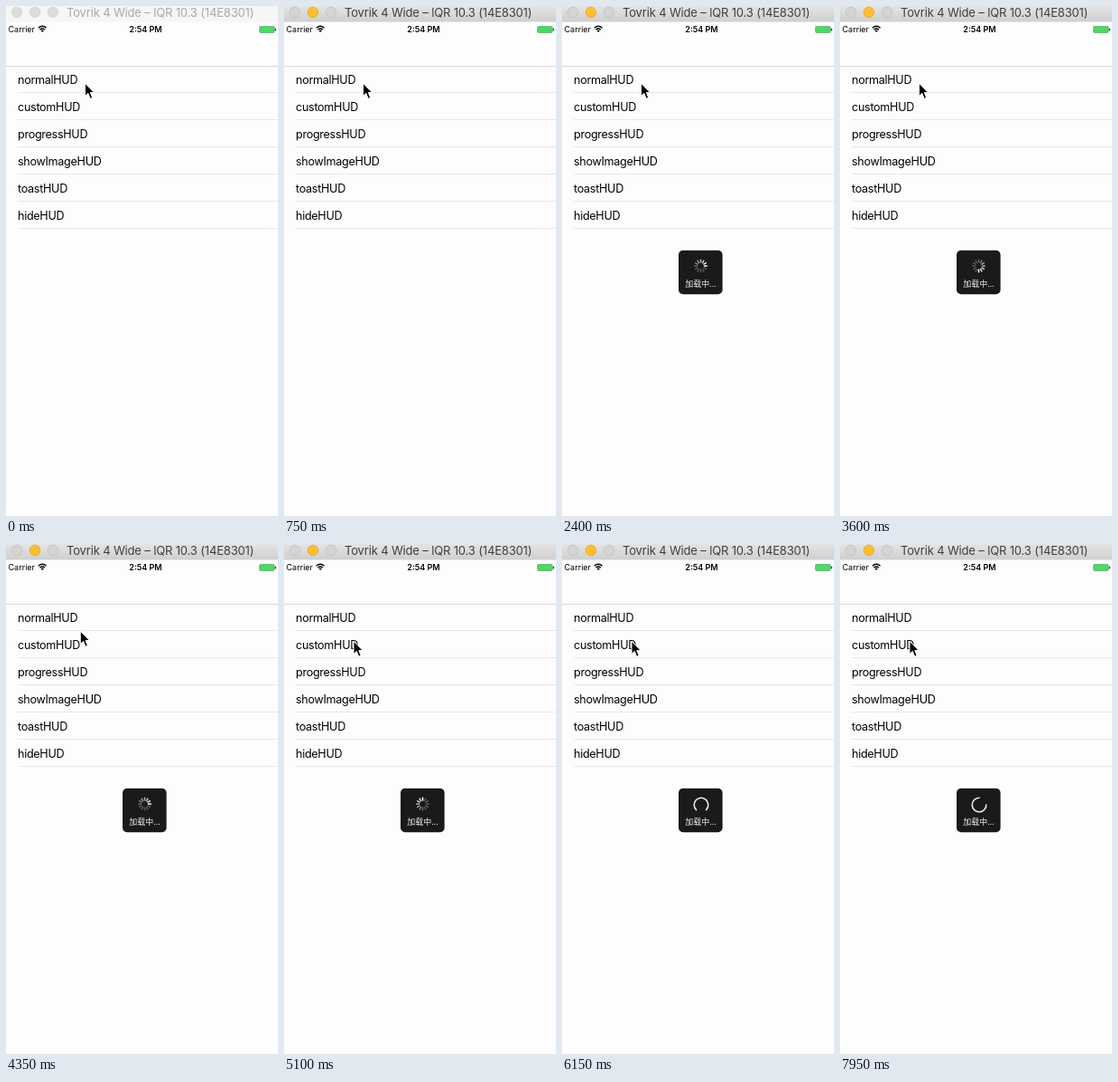
Recreate the animation shown at these times as an HTML page. Size 301x563 px, loop 8 s.

```html
<!DOCTYPE html>
<html lang="en">
<head>
<meta charset="utf-8">
<style>
  html, body { margin: 0; width: 100%; height: 100%; overflow: hidden; background: #fdfdfd; }
  svg { display: block; width: 301px; height: 563px; font-family: Inter, "Noto Sans", sans-serif; }
  .row { font-size: 12.6px; letter-spacing: -.3px; }
  .hud { font: 9px "Noto Sans CJK SC", "Noto Sans CJK", sans-serif; fill: #eee; }
</style>
</head>
<body>
<svg viewBox="0 0 301 563">
  <defs>
    <linearGradient id="chrome" x2="0" y2="1">
      <stop stop-color="#e5e4e5"/>
      <stop offset="1" stop-color="#d0cfd0"/>
    </linearGradient>
  </defs>
  <rect width="301" height="563" fill="#fdfdfd"/>

  <g id="titleBar">
    <rect id="bar" width="301" height="17.5"/>
    <g id="lights" stroke-width=".7">
      <circle cx="12" cy="7" r="5.8"/>
      <circle cx="32" cy="7" r="5.8"/>
      <circle cx="52" cy="7" r="5.8"/>
    </g>
    <text id="title" x="67" y="12" font-size="13" letter-spacing="-.15">Tovrik 4 Wide – lQR 10.3 (14E8301)</text>
  </g>

  <g font-size="9">
    <text x="2.5" y="29">Carrier</text>
    <text x="154.5" y="29" font-weight="600" text-anchor="middle">2:54 PM</text>
  </g>
  <g fill="none" stroke="#000" stroke-width="1.4">
    <path d="M35.8 24.2Q40.2 20.2 44.6 24.2M37.5 26.2Q40.2 23.8 42.9 26.2"/>
    <path d="M38.6 27.2Q40.2 25.9 41.8 27.2L40.2 28.9Z" fill="#000" stroke="none"/>
  </g>
  <rect x="280.5" y="22.5" width="16.5" height="7" rx="1.3" fill="#4cd964" stroke="#58a865" stroke-width=".7"/>
  <rect x="297.6" y="24.5" width="1.2" height="3" rx=".6" fill="#222"/>
  <rect y="66" width="301" height="1" fill="#d9d9d9"/>

  <rect id="highlight" width="301" height="30" fill="#d9d9d9"/>
  <g id="rows"></g>

  <g id="hud">
    <rect x="129" y="269.7" width="48.6" height="48.6" rx="5" fill="#191a1a"/>
    <g id="petals" stroke="#fff" stroke-width="1.5" stroke-linecap="round"></g>
    <circle id="arc" cx="154" cy="288" r="7.8" fill="none" stroke="#eee" stroke-width="1.6"
            pathLength="360" stroke-dasharray="280 80"/>
    <text class="hud" x="153.5" y="310" text-anchor="middle">加载中...</text>
  </g>

  <path id="cursor" d="M0 0V14.2L3.3 11.1 5.7 17 8.2 16 5.8 10.3H10.2Z"
        stroke="#fff" stroke-width="1" stroke-linejoin="round"/>
</svg>
<script>
const $ = id => document.getElementById(id);
const set = (el, attrs) => Object.entries(attrs).forEach(([k, v]) => el.setAttribute(k, v));
const clamp = x => Math.min(1, Math.max(0, x));

const LOOP = 8000, STEP = 150, ROW = 30, LIST_TOP = 66;
const ACTIVATE = 750, SHOW_HUD = 1050, SHOW_ARC = 5850;
const labels = ['normalHUD', 'customHUD', 'progressHUD', 'showImageHUD', 'toastHUD', 'hideHUD'];

$('rows').innerHTML = labels.map((label, i) => {
  const y = LIST_TOP + ROW * i;
  return `<text class="row" x="13" y="${y + 19.5}">${label}</text>
    <rect x="13" y="${y + 29}" width="288" height="1" fill="#e8e8e8"/>`;
}).join('');

$('petals').innerHTML = Array.from({ length: 12 }, (_, i) =>
  `<path d="M0-4V-6.8" transform="translate(153.5 287) rotate(${i * 30})"/>`).join('');

function drawTitleBar(active) {
  set($('bar'), { fill: active ? 'url(#chrome)' : '#f6f6f6' });
  set($('title'), { fill: active ? '#3f3f3f' : '#a9a9a9' });
  [...$('lights').children].forEach((light, i) => {
    const yellow = active && i === 1;
    set(light, {
      fill: yellow ? '#fdbe2f' : active ? '#d5d4d5' : '#dcdcdc',
      stroke: yellow ? '#e0a02c' : active ? '#bdbcbd' : '#d2d2d2'
    });
  });
}

// A tapped row is grey while pressed, then fades out over 300 ms.
function drawHighlight(t) {
  const second = t > 3000;
  const [row, press, release] = second ? [1, 5700, 5850] : [0, 900, 900];
  set($('highlight'), {
    y: LIST_TOP + ROW * row,
    opacity: t < press ? 0 : 1 - clamp((t - release) / 300)
  });
}

function drawHud(t) {
  const arc = t >= SHOW_ARC;
  set($('hud'), { visibility: t >= SHOW_HUD ? 'visible' : 'hidden' });
  set($('petals'), { opacity: arc ? 0 : 1 });
  set($('arc'), { opacity: arc ? 1 : 0 });

  const head = Math.floor((t - 1200) * 12 / 1000 + 1.3);
  [...$('petals').children].forEach((petal, i) => {
    const age = ((head - i) % 12 + 12) % 12;
    set(petal, { opacity: Math.max(.27, 1 - age * .11) });
  });

  const gap = 180 + (t - 6150) * .325;
  set($('arc'), { transform: `rotate(${gap - 50} 154 288)` });
}

function drawCursor(t) {
  const p = clamp((t - 4050) / 600), ease = p * p * (3 - 2 * p);
  set($('cursor'), { transform: `translate(${87.5 - 10.5 * ease} ${85.3 + 22 * ease})` });
}

function frame(now) {
  const t = Math.floor(now % LOOP / STEP) * STEP;
  drawTitleBar(t >= ACTIVATE);
  drawHighlight(t);
  drawHud(t);
  drawCursor(t);
  requestAnimationFrame(frame);
}
frame(0);
</script>
</body>
</html>
```
